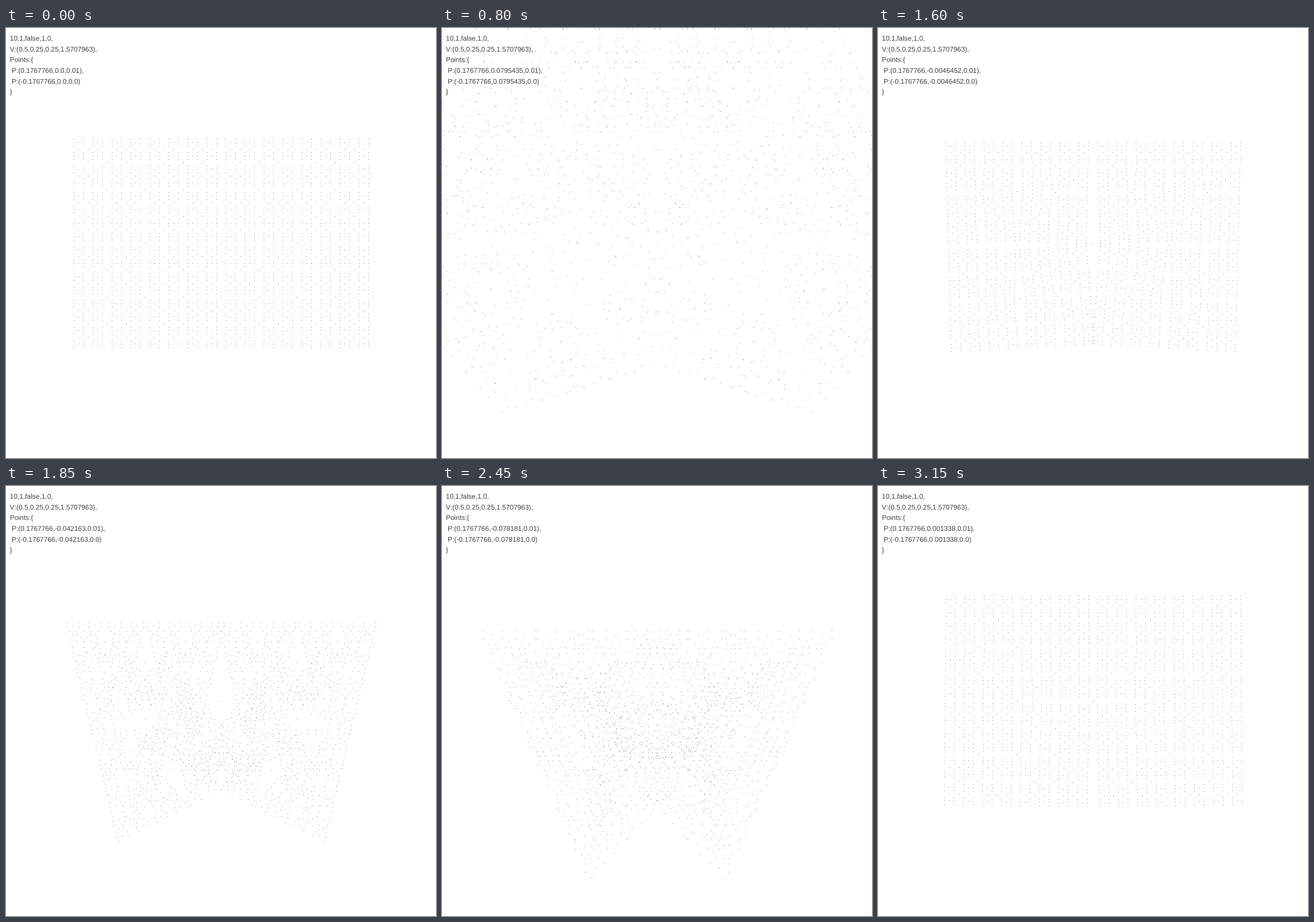
Animation of 748 by 748 pixels, one loop 3200 ms. Source, as an HTML page with a canvas:

```html
<!DOCTYPE html>
<html lang="en">
<head>
<meta charset="utf-8">
<title>Binary vector tree</title>
<style>
  html, body { margin: 0; width: 100%; height: 100%; overflow: hidden; background: #fff; }
  canvas { position: absolute; left: 0; top: 0; }
  pre {
    position: absolute; left: 6.8px; top: 8.8px; margin: 0; color: #404040;
    font: 11.92px/18.7px "Liberation Sans", Arial, sans-serif;
    font-kerning: none; text-rendering: geometricPrecision;
  }
</style>
</head>
<body>
<canvas id="stage" width="748" height="748"></canvas>
<pre id="label"></pre>
<script>
const SIZE = 748, DEPTH = 10, STEP = 50, STEPS = 64;
const LENGTH = 0.25, SPREAD = LENGTH / Math.SQRT2;
const ctx = document.getElementById('stage').getContext('2d');
const label = document.getElementById('label');
let shown = -1;

// Seven decimals, cut rather than rounded
function decimal(n) {
  const cut = Math.trunc(n * 1e7) / 1e7;
  return cut === 0 ? '0.0' : String(cut);
}

// A round dot, one pixel wide
function dot(x, y) {
  ctx.beginPath();
  ctx.arc(x * SIZE + 0.5, (1 - y) * SIZE + 0.5, 0.5, 0, 2 * Math.PI);
  ctx.fill();
}

// Each vector puts a dot at its tip and grows two turned, scaled copies there
function grow(x, y, vx, vy, lift, depth) {
  x += vx;
  y += vy;
  dot(x, y);
  if (!depth) return;
  const along = lift / LENGTH;
  for (const side of [SPREAD / LENGTH, -SPREAD / LENGTH]) {
    grow(x, y, vx * along + vy * side, vy * along - vx * side, lift, depth - 1);
  }
}

function draw(step) {
  const lift = Math.sin(step / 10) / (4 * Math.PI);
  ctx.clearRect(0, 0, SIZE, SIZE);
  ctx.fillStyle = '#404040';
  grow(0.5, 0.25, 0, LENGTH, lift, DEPTH);
  const dx = decimal(SPREAD), dy = decimal(lift);
  label.textContent = [
    '10,1,false,1,0,',
    'V:(0.5,0.25,0.25,1.5707963),',
    'Points:{',
    ` P:(${dx},${dy},0.01),`,
    ` P:(-${dx},${dy},0.0)`,
    '}'
  ].join('\n');
}

function tick() {
  const step = Math.floor(performance.now() / STEP) % STEPS;
  if (step !== shown) draw(shown = step);
  requestAnimationFrame(tick);
}
tick();
</script>
</body>
</html>
```
